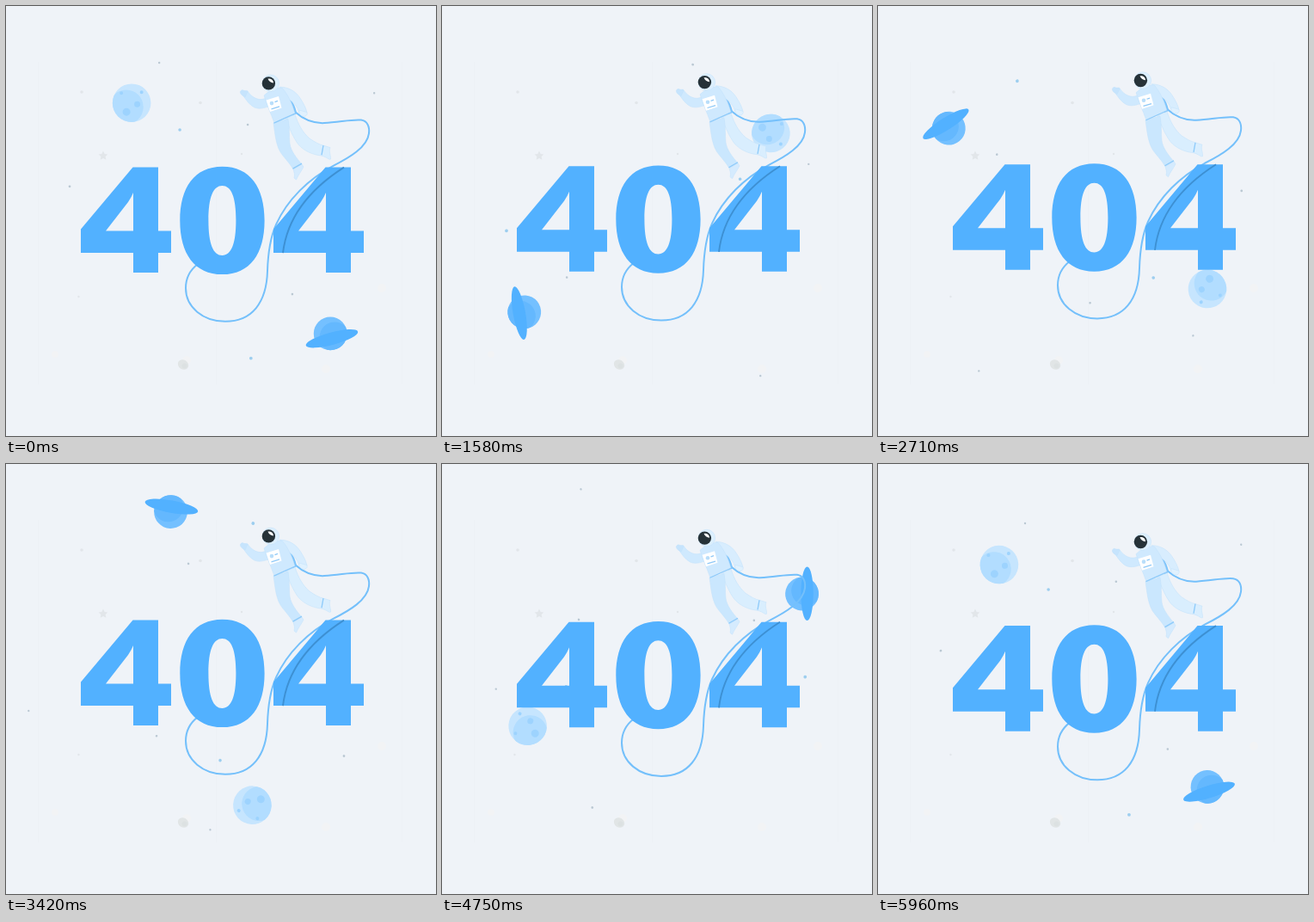
Animation of 500x500 px, one loop 6 s. Source, as an HTML page:

```html
<!DOCTYPE html>
<html lang="en">
<head>
<meta charset="utf-8">
<title>404</title>
<style>
html, body { margin: 0; width: 100%; height: 100%; overflow: hidden; background: #eff3f8; }
svg { display: block; width: 100vw; height: 100vh; }
</style>
</head>
<body>
<svg viewBox="0 0 500 500" role="img" aria-label="404">
  <defs>
    <clipPath id="moonClip"><circle r="22.3"/></clipPath>
    <clipPath id="ballClip"><circle r="19.4"/></clipPath>
    <path id="four" fill-rule="evenodd" d="M147.5 187.4H177V261.5H192V287H177V310H148V287H87V259.5ZM148 217Q146 222 142 228L116 261.5H148Z"/>
  </defs>

  <!-- still background -->
  <path d="M37.5 65V440M244.5 65V440M460.5 65V440" stroke="#edf1f6"/>
  <g fill="#e2e6ea">
    <circle cx="88" cy="100" r="1.8"/>
    <circle cx="226" cy="112.500" r="1.8"/>
    <circle cx="274" cy="172" r="1.2"/>
    <circle cx="84.500" cy="338" r="1.2"/>
    <path d="M113 168.500l1.700 3.400 3.600.5-2.600 2.600.6 3.700-3.300-1.700-3.300 1.700.6-3.700-2.600-2.600 3.600-.5Z"/>
  </g>
  <g fill="#f2f3f5">
    <circle cx="437" cy="328" r="5"/>
    <circle cx="372" cy="422" r="5"/>
    <circle cx="57" cy="405" r="4"/>
    <circle cx="210" cy="412" r="5"/>
  </g>
  <ellipse cx="206" cy="417" rx="6.500" ry="5.500" fill="#e1e5e6" transform="rotate(35 206 417)"/>
  <circle cx="207.500" cy="418.500" r="3" fill="#dce1e2"/>

  <!-- orbiting sky -->
  <g id="orbit">
    <g id="dots"></g>
    <g transform="translate(146 112.800)">
      <circle r="22.300" fill="#c6e5fe"/>
      <circle cx="-6.400" cy="4.800" r="20" fill="#b2ddff" clip-path="url(#moonClip)"/>
      <g fill="#9dd3fe">
        <circle cx="-12" cy="-11.500" r="2"/>
        <circle cx="11.500" cy="-12.500" r="2"/>
        <circle cx="6.500" cy="1.500" r="3.500"/>
        <circle cx="-6" cy="10.500" r="4.500"/>
      </g>
    </g>
    <g transform="translate(377.300 380.800)">
      <circle r="19.400" fill="#74c0ff"/>
      <circle cx="5" cy="4" r="17.500" fill="#64b8fe" clip-path="url(#ballClip)"/>
      <ellipse cx="1.800" cy="5.800" rx="31.300" ry="7.200" fill="#52b1ff" transform="rotate(-15 1.800 5.800)"/>
    </g>
  </g>

  <!-- floating group -->
  <g id="float">
    <path d="M336 123C347 133 358 136.500 370 136C388 135 402 131.500 413 132.500C420 133.500 423 140 422 148C420 164 400 176 380 186C352 201 327 225 314 254C306 272 304.500 292 304 308C303 345 286 366.700 255 366.700C229 366.700 209 350 209 328C209 316 214 307 223 300" fill="none" stroke="#74c0fb" stroke-width="2"/>
    <g fill="#52b1ff">
      <use href="#four"/>
      <use href="#four" x="224"/>
      <path fill-rule="evenodd" d="M251.500 186.600C284 186.600 300.600 211 300.600 249.300S284 312 251.500 312S202.300 287.500 202.300 249.300S219 186.600 251.500 186.600ZM251.400 209C241 209 235.400 222 235.400 249.300S241 289.800 251.400 289.800S267.400 276.500 267.400 249.300S262 209 251.400 209Z"/>
    </g>
    <path d="M393 187.500C353 213 327 245 322 287" fill="none" stroke="#3d90d3" stroke-width="1.900"/>

    <g stroke="#c0e0fa" stroke-width=".5" stroke-linejoin="round">
      <path fill="#7cc3fb" stroke="none" d="M326 103C332 108 337 117 338 125L333 128Z"/>
      <path fill="#d8edfe" d="M318 94C328 94 337 99 342 107C346 113 349 119 350 124L341 124C339 117 335 112 328 108Z"/>
      <path fill="#e0f1fe" d="M341 121L350 123.500C351 127 348 129 345 128C342 127 340 124 341 121Z"/>
      <path fill="#d9eefe" d="M325 131L336 126C340 138 345 147 353 154C359 158 364 161 369 162L367 174C356 173 346 168 340 161C334 153 330 143 325 131Z"/>
      <path fill="#d9eefe" d="M369 162L377 164.500C375 169 378 174 377.500 178C375 179 374 176 367 174Z"/>
      <path fill="#cae7fe" d="M311 136C313 150 314 165 322 174C327 180 332 186 334 190L344 184C338 177 331 168 330 160C329 150 330 142 328 131Z"/>
      <path fill="#d5ebfe" d="M334 190L344 184L346 187C343 193 340 196 337.500 202L335 200C336 196 335 193 334 190Z"/>
      <path fill="#cfe9fe" d="M305 106C298 109.500 293 109 288 106C285 104 283 102 281 99L275 103C279 109 283 115 289 118C294 120 300 119 307 116Z"/>
      <path fill="#c6e4fd" d="M281 99.500C281 97 278 99.500 275 97.500C271 98.500 272 102 275 104L278 106Z"/>
      <path fill="#cfe9fe" d="M300 104C306 98 314 95 321 95C328 103 333 114 336 125L312 136C308 125 303 114 300 104Z"/>
      <circle cx="307.800" cy="89.800" r="9.800" fill="#dceffe"/>
    </g>
    <path d="M311.500 136L336 125M333.500 189L344 183M367 173L369 162" fill="none" stroke="#8fcbfa" stroke-width="1.300"/>
    <path fill="#fff" d="M302.500 109.500L317 105L320.500 118.500L307 123Z"/>
    <circle cx="309" cy="113" r="2.300" fill="#b9defa"/>
    <path d="M312.500 111.500L316 110.300M308.500 119.700L318 116.800" stroke="#8fc9f7" stroke-width="1.300"/>
    <circle cx="305.400" cy="89.800" r="7.700" fill="#263238"/>
    <path d="M304.500 84.500C308 84 311 86 311 89.500C308 89 305.500 87.500 304.500 84.500Z" fill="#fff"/>
  </g>
</svg>
<script>
const LOOP = 6000, BOB = 1500;
const $ = id => document.getElementById(id);
const orbit = $('orbit'), float = $('float');

// x, y, radius
const grey = [[178, 66, 1.2], [428, 101, 1.2], [281, 138, 1.3], [74, 210, 1.4], [333, 335, 1.3]];
const blue = [[202, 144, 1.8], [285, 409.5, 1.9]];
const dot = fill => ([x, y, r]) => `<circle cx="${x}" cy="${y}" r="${r}" fill="${fill}"/>`;
$('dots').innerHTML = grey.map(dot('#bac8d3')).join('') + blue.map(dot('#9dceef')).join('');

// Sharp turn at the bottom of the drift, soft turn at the top
function drift(t) {
  const p = Math.abs(((t + 36) % BOB) / (BOB / 2) - 1);
  return 9 * p ** 1.4 - 8.3;
}

function draw(now) {
  const t = now % LOOP;
  orbit.setAttribute('transform', `rotate(${t * 360 / LOOP} 248 239)`);
  float.setAttribute('transform', `translate(0 ${drift(t)})`);
  requestAnimationFrame(draw);
}
draw(0);
</script>
</body>
</html>
```
